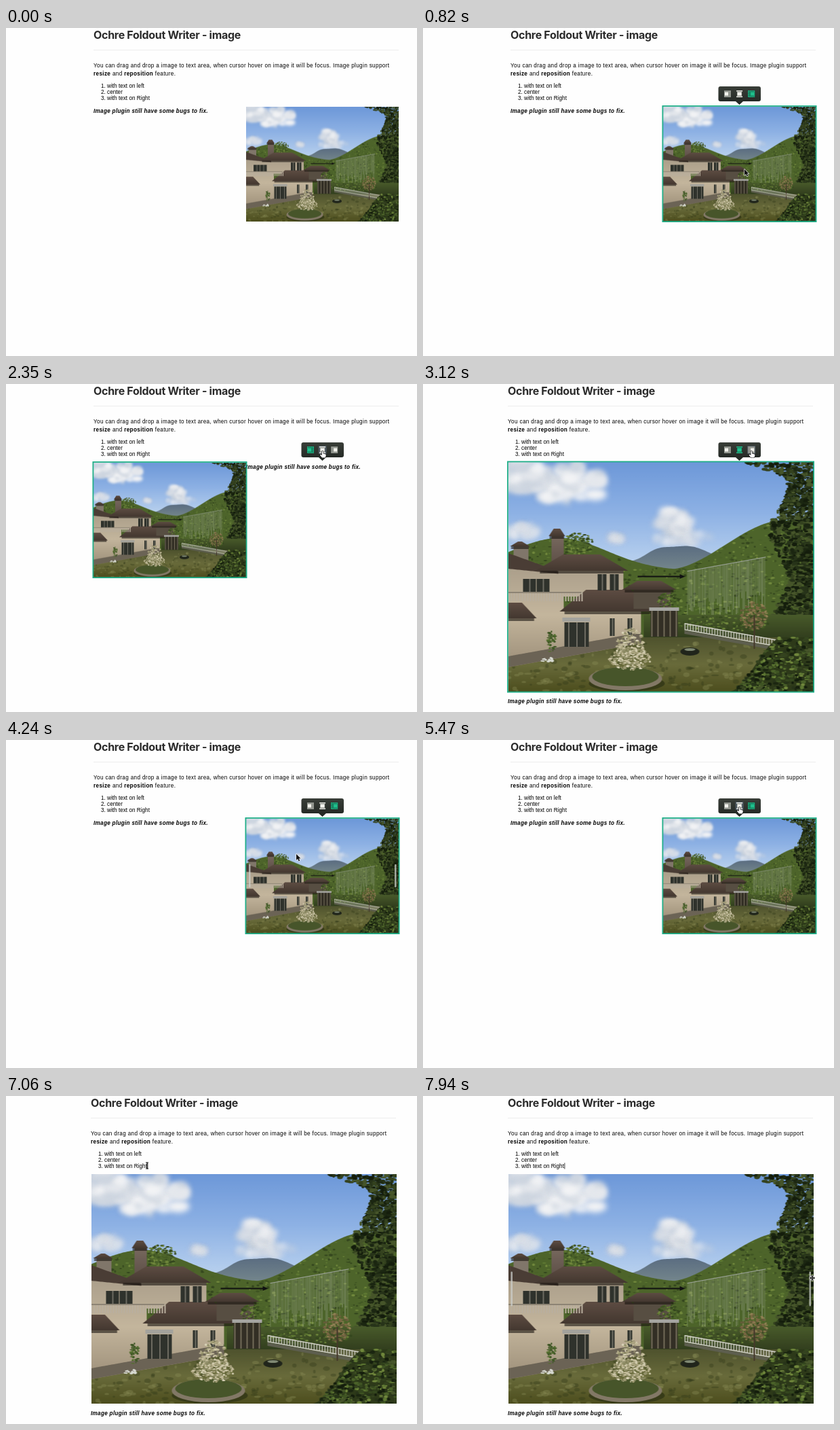
Recreate the animation shown at these times as an HTML page with a canvas. Size 606 by 483 pixels, loop 8 s.

```html
<!DOCTYPE html>
<html lang="en">
<head>
<meta charset="utf-8">
<title>Image plugin demo</title>
<style>
html, body { margin: 0; width: 100%; height: 100%; overflow: hidden; background: #fefefe; }
svg, canvas { position: absolute; left: 0; top: 0; display: block; }
text { font: 8.2px "Liberation Sans", Arial, sans-serif; fill: #000; white-space: pre; }
.title { font: 700 16px Inter, sans-serif; letter-spacing: -.3px; fill: #2b2b2b; }
.para { letter-spacing: .34px; }
.bold { font-weight: 700; }
.note { font-weight: 700; font-style: italic; letter-spacing: .28px; }
</style>
</head>
<body>
<svg width="606" height="483">
  <g id="page">
    <text class="title" x="129" y="16">Ochre Foldout Writer - image</text>
    <path d="M129 32.5H579" stroke="#ededed"/>
    <text class="para" x="129" y="57.5">You can drag and drop a image to text area, when cursor hover on image it will be focus. Image plugin support</text>
    <text class="para" x="129" y="69.5"><tspan class="bold">resize</tspan> and <tspan class="bold">reposition</tspan> feature.</text>
    <text x="140" y="88">1. with text on left</text>
    <text x="140" y="97">2. center</text>
    <text x="140" y="106">3. with text on Right</text>
  </g>
  <text id="note" class="note">Image plugin still have some bugs to fix.</text>
</svg>
<canvas id="stage" width="606" height="483"></canvas>
<script>
const LOOP = 8000;
const KINDS = ['left', 'center', 'right'];
const page = document.getElementById('page');
const note = document.getElementById('note');
const ctx = document.getElementById('stage').getContext('2d');

let seed = 11;
const rnd = () => (seed = (seed * 16807) % 2147483647) / 2147483647;
const pick = list => list[Math.floor(rnd() * list.length)];
const smooth = v => { const u = Math.min(1, Math.max(0, v)); return u * u * (3 - 2 * u); };
const bump = (x, mid, width) => Math.exp(-(((x - mid) / width) ** 2));

// A lakeside house in flat shapes, built from ridge formulas and scattered leaves.
function paintPhoto(W, H) {
  const cv = document.createElement('canvas');
  cv.width = W;
  cv.height = H;
  const g = cv.getContext('2d');

  const fade = (y0, y1, ...cols) => {
    const f = g.createLinearGradient(0, y0, 0, y1);
    cols.forEach((c, i) => f.addColorStop(i / (cols.length - 1), c));
    return f;
  };
  const rect = (c, x, y, w, h) => { g.fillStyle = c; g.fillRect(x, y, w, h); };
  const blob = (c, x, y, rx, ry = rx) => {
    g.fillStyle = c;
    g.beginPath();
    g.ellipse(x, y, rx, ry, 0, 0, 7);
    g.fill();
  };
  const area = (c, top, bottom, x0 = 0, x1 = W) => {
    g.fillStyle = c;
    g.beginPath();
    for (let x = x0; x <= x1; x += 2) g.lineTo(x, top(x));
    for (let x = x1; x >= x0; x -= 2) g.lineTo(x, bottom(x));
    g.fill();
  };
  const dabs = (cols, n, size, place) => {
    while (n--) blob(pick(cols), ...place(), size * (.4 + rnd()), size * (.3 + rnd() * .6));
  };
  const tuft = (cols, x, y, rx, ry, n, size = 2) => dabs(cols, n, size, () => {
    const a = rnd() * 2 * Math.PI, r = Math.sqrt(rnd());
    return [x + Math.cos(a) * r * rx, y + Math.sin(a) * r * ry];
  });
  const hill = (c, cols, top, x0, x1) => {
    area(c, top, () => 258, x0, x1);
    dabs(cols, 700, 2.2, () => {
      const x = x0 + rnd() * (x1 - x0), y = top(x) + 2;
      return [x, y + rnd() * (258 - y)];
    });
  };
  const cloud = (x, y, rx, ry) => {
    g.filter = 'blur(4px)';
    tuft(['#e4e7ec', '#ccd4df', '#f2f3f5'], x, y, rx, ry, 50, ry * .45);
    g.filter = 'none';
  };
  const roof = (x, y, w, h, inset) => {
    g.fillStyle = fade(y, y + h, '#5d4c42', '#43372f');
    g.beginPath();
    g.moveTo(x, y + h);
    g.lineTo(x + w * inset, y);
    g.lineTo(x + w * (1 - inset), y);
    g.lineTo(x + w, y + h);
    g.fill();
    rect('rgba(25,20,16,.6)', x + w * .05, y + h, w * .9, 4);
  };
  const windows = (x, y, n, step, w, h) => {
    for (let i = 0; i < n; i++) {
      rect('#2f322c', x + i * step, y, w, h);
      rect('#a8a294', x + i * step + w / 2, y, 1, h);
    }
  };

  rect(fade(0, 150, '#6c97d8', '#8db1e4', '#b9d1ee'), 0, 0, W, H);
  cloud(88, 32, 50, 27);
  cloud(22, 20, 38, 24);
  cloud(20, 102, 28, 10);
  cloud(246, 88, 24, 18);
  cloud(258, 112, 42, 10);
  cloud(158, 112, 12, 6);

  const green = ['#3f5423', '#5d7732', '#4a6129', '#70873c', '#34461e'];
  const dark = ['#1b2611', '#273319', '#34421f', '#141d0c', '#46552a'];
  area(fade(122, 160, '#596b80', '#75878c'), x => 148 - 24 * bump(x, 265, 45) - 12 * bump(x, 218, 25), () => 170, 170, 350);
  hill('#4d642a', green, x => 160 - 48 * bump(x, 75, 100), 0, 300);
  hill('#4d642a', green, x => 158 - 72 * smooth((x - 235) / 170), 226, W);
  tuft(green, 104, 120, 22, 16, 130);

  // Hanging water veil.
  for (let x = 264; x < 380; x += 2) {
    const top = 160 - (x - 264) * .18;
    rect(`rgba(190,193,182,${.2 + rnd() * .35})`, x, top, 1, 45 + rnd() * 35);
    rect('#9ca39a', x, top, 2, 1);
  }

  // Overhanging trees on the right.
  const edge = y => 400 + 14 * Math.sin(y / 22) - 50 * bump(y, 0, 14);
  dabs(dark, 1500, 3.6, () => {
    const y = rnd() * 270, x = edge(y);
    return [x + rnd() * (W - x), y];
  });

  // Pond and far bank.
  rect(fade(225, 262, '#485a2a', '#2f3b1c'), 200, 225, W, 35);
  tuft(green, 320, 238, 70, 12, 160);
  rect(fade(258, H, '#4e522d', '#686a3a', '#4c4d1d'), 0, 258, W, H);
  dabs(['rgba(140,144,90,.35)', 'rgba(45,54,22,.35)'], 260, 4, () => [rnd() * W, 264 + rnd() * 74]);

  // House.
  const shore = x => 302 - .18 * x;
  const cream = fade(150, 300, '#a99d89', '#c3b59c', '#9c8e78');
  rect('#80766a', 8, 122, 22, 24);
  roof(3, 117, 29, 7, .4);
  area(cream, x => 150 + x * .12, shore, 0, 82);
  area(cream, () => 216, shore, 80, 196);
  area('#6b6355', x => shore(x) - 16, shore, 0, 196);
  rect(cream, 72, 158, 98, 40);
  area('#4a3d35', x => 134 + x * .36, x => 157 + x * .1, 0, 74);
  rect(fade(105, 160, '#796a60', '#574a42'), 64, 108, 18, 50);
  roof(60, 98, 24, 11, .3);
  roof(40, 136, 137, 24, .3);
  roof(76, 188, 144, 32, .27);
  roof(-30, 207, 72, 23, .3);
  windows(22, 172, 2, 20, 19, 20);
  windows(132, 165, 2, 18, 13, 24);
  windows(150, 230, 2, 26, 7, 26);
  for (let x = 0; x < 110; x += 4) rect('#b9af9f', x, 192, 2, 13);
  rect('#8d8474', 0, 191, 108, 2);

  // Bay window, annexe and gazebo.
  windows(83, 236, 3, 12, 12, 36);
  rect('#a3a29c', 80, 229, 41, 6);
  rect('#574e42', 185, 186, 55, 30);
  roof(168, 175, 80, 13, .28);
  tuft(green, 238, 206, 18, 14, 90);
  rect('#332f25', 210, 219, 40, 38);
  for (let x = 211; x < 252; x += 9) rect('#706a57', x, 219, 2, 38);
  rect('#a5a5a1', 208, 214, 44, 5);
  rect('#111', 191, 167.5, 66, 2);
  g.beginPath();
  g.moveTo(253, 165);
  g.lineTo(261, 168.5);
  g.lineTo(253, 172);
  g.fill();

  // Bridge.
  for (let x = 260; x < 404; x++) {
    const y = 237 + (x - 260) * .18;
    rect('#d2d2c8', x, y, 1, 1.5);
    rect('#d2d2c8', x, y + 9, 1, 1.5);
    rect('#5d5e4e', x, y + 11, 1, 5);
    if (x % 4 === 0) rect('#c6c6bb', x, y, 1.5, 10);
  }

  // Right bank, boat, island and pale shrub.
  tuft(['#7d6845', '#665b3a', '#918055'], 362, 226, 20, 21, 150);
  rect('#45382a', 362, 225, 2, 50);
  const bank = x => H - 80 * smooth((x - 325) / 80);
  area('#2d3919', bank, () => H, 326, W);
  dabs(dark.concat(green), 500, 3, () => {
    const x = 340 + rnd() * 110, y = bank(x);
    return [x, y + rnd() * (H - y)];
  });
  blob('#20251b', 268, 279, 14, 6);
  blob('#7f8973', 268, 276, 8, 2);
  blob('#373b18', 175, 326, 56, 12);
  blob('#827866', 173, 319, 54, 17);
  blob('#47552a', 173, 316, 49, 14);
  const pale = ['#c4bc9b', '#a49e78', '#dad4b9', '#8b8963'];
  tuft(pale, 180, 272, 20, 28, 260);
  tuft(pale, 180, 290, 31, 16, 200);
  tuft(['#3f5625', '#55702f'], 64, 264, 7, 16, 45);
  tuft(['#d7dad1'], 58, 291, 11, 3, 18);
  return cv;
}

const photo = paintPhoto(450, 338);

function boxOf(layout) {
  if (layout === 'center') return [125.5, 115, 450, 338];
  return [layout === 'left' ? 129 : 354, 115.5, 225, 169];
}

// Pointer moves: start, end, goal.
const iconX = i => 449 + 17.6 * i;
const onIcon = kind => [iconX(KINDS.indexOf(kind)), 99];
const MOVES = [
  [240, 820, [474, 208]],
  [1120, 1560, onIcon('left')],
  [1940, 2350, onIcon('center')],
  [2650, 3120, onIcon('right')],
  [3760, 4530, [402, 200]],
  [4590, 5350, onIcon('center')],
  [5480, 6000, [409, 219]],
  [6180, 6760, [208, 102]],
  [7060, 7710, [574, 268]]
];

function pointerAt(t) {
  if (t < 240) return null;
  let pos = [581, 240];
  for (const [t0, t1, goal] of MOVES) {
    const e = smooth((t - t0) / (t1 - t0));
    pos = pos.map((v, i) => v + (goal[i] - v) * e);
  }
  return pos;
}

const layoutAt = t =>
  t < 1700 ? 'right' : t < 2470 ? 'left' : t < 3590 ? 'center' : t < 5480 ? 'right' : 'center';
const focusedAt = t => (t >= 380 && t < 6700) || (t >= 7140 && t < 7650);

function roundRect(x, y, w, h, r, fill) {
  ctx.fillStyle = fill;
  ctx.beginPath();
  ctx.roundRect(x, y, w, h, r);
  ctx.fill();
}

function drawIcon(kind, x, active) {
  const rect = (c, dx, dy, w, h) => { ctx.fillStyle = c; ctx.fillRect(x + dx, 97 + dy, w, h); };
  const main = active ? '#20c08c' : '#f4f4ee', soft = active ? '#178463' : '#91958e';
  if (kind === 'center') {
    rect(main, -4.5, -5, 9, 1.5);
    rect(main, -4.5, 3.5, 9, 1.5);
    rect(soft, -3.5, -3.5, 7, 7);
    rect(main, -3, -2.5, 6, 5);
    return;
  }
  rect(soft, -5, -5, 10, 10);
  rect(main, kind === 'left' ? -4 : -1, -2.5, 5, 5);
  if (active) {
    ctx.strokeStyle = main;
    ctx.lineWidth = 1;
    ctx.setLineDash([1.5, 1]);
    ctx.strokeRect(x - 4.5, 92.5, 9, 9);
    ctx.setLineDash([]);
  }
}

function drawToolbar(layout, hoverX) {
  const f = ctx.createLinearGradient(0, 86, 0, 108);
  f.addColorStop(0, '#393e38');
  f.addColorStop(1, '#252a26');
  roundRect(435.5, 86, 62.5, 22, 3, f);
  ctx.fillStyle = '#252a26';
  ctx.beginPath();
  ctx.moveTo(461, 108);
  ctx.lineTo(472, 108);
  ctx.lineTo(466.5, 113);
  ctx.fill();
  KINDS.forEach((kind, i) => {
    const x = iconX(i);
    if (Math.abs(hoverX - x) < 8.5) roundRect(x - 6, 91, 12, 12, 1, 'rgba(150,175,215,.3)');
    drawIcon(kind, x, kind === layout);
  });
}

const POINTERS = {
  arrow: { path: 'M0 0V9L2.1 7.1L3.6 10.4L5.2 9.7L3.8 6.6H6.5Z', fill: '#111', line: '#fff' },
  hand: { path: 'M-.8 0Q.2 -1 1 0V3.5L4.8 4.6Q5.5 5 5 7L4.2 9.4H-.6L-3.4 6Q-3.8 4.6 -2.5 4.8L-.8 6Z', fill: '#fff', line: '#111' },
  beam: { path: 'M-2 -4H2M0 -4V5M-2 5H2', fill: 'transparent', line: '#111' },
  move: { path: 'M0 -4L2 -2H.7V2H2L0 4L-2 2H-.7V-2H-2ZM-4 0L-2 -2V-.7H2V-2L4 0L2 2V.7H-2V2Z', fill: '#111', line: '#fff' }
};

function drawPointer(kind, [x, y]) {
  const { path, fill, line } = POINTERS[kind], shape = new Path2D(path);
  ctx.save();
  ctx.translate(x, y);
  ctx.lineJoin = 'round';
  ctx.lineWidth = 1.2;
  ctx.strokeStyle = line;
  ctx.stroke(shape);
  ctx.fillStyle = fill;
  ctx.fill(shape);
  ctx.restore();
}

function draw(t) {
  const layout = layoutAt(t), wide = layout === 'center';
  const [x, y, w, h] = boxOf(layout);
  const pointer = pointerAt(t), focused = focusedAt(t);
  const overBar = focused && pointer && pointer[1] < 110 && pointer[0] > 436 && pointer[0] < 498;

  page.setAttribute('transform', `translate(${wide ? -4 : 0} 0)`);
  note.setAttribute('x', wide ? 125 : layout === 'left' ? 354 : 129);
  note.setAttribute('y', wide ? 470 : 124.5);

  ctx.clearRect(0, 0, 606, 483);
  ctx.imageSmoothingQuality = 'high';
  ctx.drawImage(photo, x, y, w, h);
  if (focused) {
    ctx.strokeStyle = '#1fae88';
    ctx.lineWidth = 1.8;
    ctx.strokeRect(x - .6, y - .6, w + 1.2, h + 1.2);
  }

  const bar = wide ? 51 : 34;
  const handle = hx => roundRect(hx, y + (h - bar) / 2, 2.5, bar, 1.2, 'rgba(205,208,205,.75)');
  const resizing = t >= 3950 && t < 4530;
  if (resizing || t >= 7940) handle(x + 4);
  if (resizing || t >= 7600) handle(x + w - 6);

  if (focused) drawToolbar(layout, overBar ? pointer[0] : -1);
  if (t >= 7060) {
    ctx.fillStyle = '#111';
    ctx.fillRect(208.5, 98.5, .8, 9);
  }
  if (pointer) {
    const overText = t > 6600 && pointer[1] < 114;
    drawPointer(overBar ? 'hand' : t >= 7650 ? 'move' : overText ? 'beam' : 'arrow', pointer);
  }
}

const start = performance.now();
function tick() {
  draw((performance.now() - start) % LOOP);
  requestAnimationFrame(tick);
}
tick();
</script>
</body>
</html>
```
